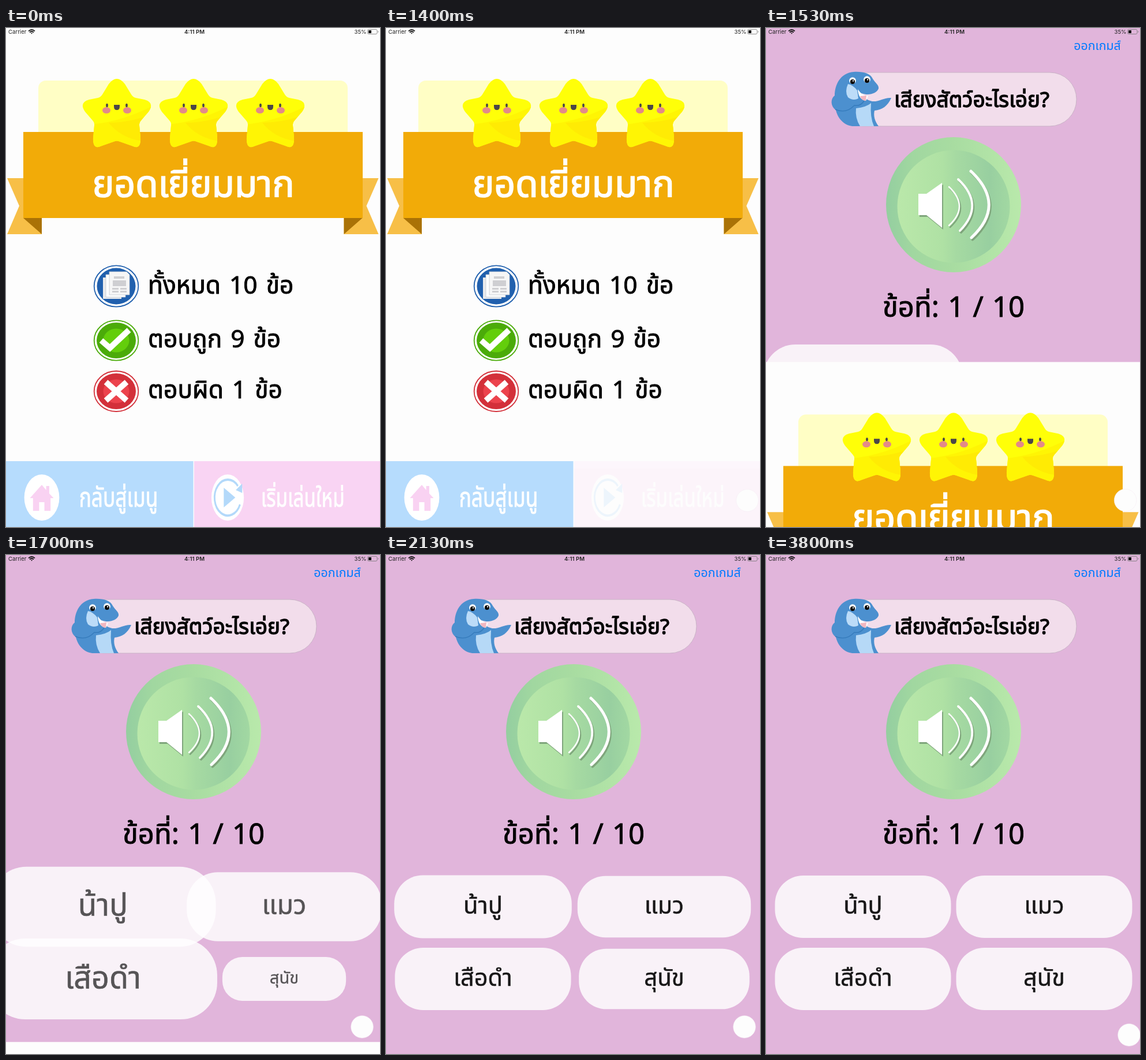
An HTML page for the animation above (4000 ms loop, 648x864 px).

```html
<!DOCTYPE html>
<html lang="th">
<head>
<meta charset="utf-8">
<title>Quiz result</title>
<style>
  html, body { margin: 0; width: 100%; height: 100%; overflow: hidden; background: #e1b5db; }
  svg { display: block; width: 648px; height: 864px; }
  text { font-family: "Noto Sans Thai Looped", "Noto Sans Thai", "Noto Sans", sans-serif; }
  .mid { text-anchor: middle; }
  .dark { fill: #000; stroke: #000; stroke-width: .9; }
  .light { fill: #fff; stroke: #fff; stroke-width: .9; }
  .row { font-size: 42.5px; word-spacing: 4px; }
  .status text { font: 9.6px Inter, sans-serif; fill: #222; }
  .status .clock { font-weight: 600; }
</style>
</head>
<body>
<svg viewBox="0 0 648 864">
  <defs>
    <linearGradient id="rim">
      <stop offset="0" stop-color="#94cea0"/><stop offset=".2" stop-color="#a1d7a0"/>
      <stop offset=".5" stop-color="#a8dca1"/><stop offset="1" stop-color="#b9e9ab"/>
    </linearGradient>
    <linearGradient id="face">
      <stop offset="0" stop-color="#bae8aa"/><stop offset=".4" stop-color="#afe1a4"/>
      <stop offset=".52" stop-color="#a6daa2"/><stop offset=".82" stop-color="#98cfa0"/>
      <stop offset="1" stop-color="#a2d8a2"/>
    </linearGradient>
    <path id="starShape" d="M-14 97Q0 79 14 97L25 115Q28 120 33 121L48 124Q66 129 55 145L42 160Q38 164 39 169L41 190Q42 212 26 204L6 197Q0 194-6 197L-26 204Q-42 212-41 190L-39 169Q-38 164-42 160L-55 145Q-66 129-48 124L-33 121Q-28 120-25 115Z"/>
    <clipPath id="starClip"><use href="#starShape"/></clipPath>
    <g id="star">
      <use href="#starShape" fill="#ffff08"/>
      <g clip-path="url(#starClip)">
        <path d="M-60 168Q0 166 60 136V210H-60Z" fill="#fff504"/>
        <path d="M-14 164Q6 190 44 196V210H60V150Q20 164-14 164Z" fill="#ffeb04"/>
      </g>
      <g fill="#4b4748">
        <ellipse cx="-17" cy="134" rx="1.9" ry="3.2"/>
        <ellipse cx="17" cy="134" rx="1.9" ry="3.2"/>
        <path d="M-5 133H5V136Q5 142 0 142T-5 136Z"/>
      </g>
      <g fill="#e38a88">
        <ellipse cx="-18" cy="142.500" rx="7" ry="5.500"/>
        <ellipse cx="18" cy="142.500" rx="7" ry="5.500"/>
      </g>
    </g>
    <g id="tail">
      <path d="M2 260H62V357H2L23 308Z" fill="#f7bf47"/>
      <path d="M30 329H62V357Z" fill="#aa7206"/>
    </g>
    <g id="speaker">
      <path d="M264 287H278L305 268V346L278 324H264Z" stroke="none"/>
      <g fill="none" stroke-linecap="round">
        <path d="M317 275Q353 309 317 342" stroke-width="2.500"/>
        <path d="M333 262Q380 306 336 351" stroke-width="3.800"/>
        <path d="M355 248Q417 306 356 363" stroke-width="5"/>
      </g>
    </g>
  </defs>

  <g id="game">
    <rect width="648" height="864" fill="#e1b5db"/>
    <text x="574" y="38" class="mid" font-size="21.300" fill="#007aff">ออกเกมส์</text>
    <rect x="122" y="77" width="416" height="93" rx="46" fill="#f2ddeb" stroke="#c9b2c6"/>
    <text x="356.500" y="137" class="mid dark" font-size="37" style="stroke-width:1.3">เสียงสัตว์อะไรเอ่ย?</text>

    <g id="dolphin">
      <path d="M152 76C128 78 119 99 119 117C111 123 112 136 121 142C125 160 139 170 152 170H195C188 161 186 151 188 143C201 142 211 135 217 121C205 120 196 128 184 127C175 125 168 120 166 113C178 118 192 113 195 105C196 99 190 96 185 88C181 78 166 75 152 76Z" fill="#4c90cf"/>
      <path d="M142 97Q136 110 142 120Q151 127 160 122L158 108Q150 98 142 97Z" fill="#bcdcf8"/>
      <path d="M156 139Q174 137 182 130Q180 154 187 170H163Q154 156 156 139Z" fill="#b6d9f7"/>
      <path d="M120 141Q139 149 153 134Q164 136 170 126" fill="none" stroke="#367cbd" stroke-width="1.500"/>
      <path d="M159 106Q166 117 177 118L173 126Q160 124 159 106Z" fill="#fff"/>
      <path d="M163 118L174 117L173 126Q166 126 163 118Z" fill="#f3b6c0"/>
      <circle cx="150" cy="91" r="5.800" fill="#fff"/><circle cx="175" cy="89" r="5.800" fill="#fff"/>
      <circle cx="150" cy="93" r="4"/><circle cx="175" cy="91" r="4"/>
      <circle cx="151" cy="91.500" r="1.200" fill="#fff"/><circle cx="176" cy="89.500" r="1.200" fill="#fff"/>
    </g>

    <circle cx="325" cy="306" r="117" fill="url(#rim)"/>
    <circle cx="325" cy="309" r="97.500" fill="url(#face)"/>
    <use href="#speaker" x="2" y="3" fill="#7fa57c" stroke="#7fa57c"/>
    <use href="#speaker" fill="#fff" stroke="#fff"/>
    <text x="325" y="500" class="mid dark" font-size="49" word-spacing="2.500">ข้อที่: 1 / 10</text>
    <g id="answers"></g>
  </g>

  <g id="sheet">
    <rect width="648" height="864" fill="#fdfdfd"/>
    <rect x="56" y="91" width="536" height="110" rx="13" fill="#fffec5"/>
    <use href="#tail"/>
    <use href="#tail" transform="translate(647.500) scale(-1 1)"/>
    <rect x="30" y="180" width="588" height="149" fill="#f2ab08"/>
    <use href="#star" x="192"/><use href="#star" x="325"/><use href="#star" x="458"/>
    <text x="324.500" y="292" class="mid light" font-size="64" style="stroke-width:1.6">ยอดเยี่ยมมาก</text>

    <g fill="#2060ae">
      <ellipse cx="191" cy="447" rx="38.300" ry="35.700" fill="#fff" stroke="#2060ae" stroke-width="1.800"/>
      <ellipse cx="191" cy="447" rx="33.500" ry="31.500"/>
      <path d="M168 432H200V469H168Z" fill="#e9eaec"/>
      <path d="M173 427H207V466H173Z" fill="#fff" stroke="#b9c3d0" stroke-width=".8"/>
      <path d="M179 422H209L214 427V462H179Z" fill="#f6f6f6" stroke="#c3c8d0" stroke-width=".8"/>
      <path d="M187 430H205V434H187ZM185 437H208V447H185ZM184 450H195V453H184ZM198 450H209V453H198ZM184 455H195V458H184ZM198 455H209V458H198Z" fill="#cfcfd2"/>
    </g>
    <ellipse cx="191" cy="541" rx="38.300" ry="34.700" fill="#fff" stroke="#4bab09" stroke-width="1.800"/>
    <ellipse cx="191" cy="541" rx="34" ry="31" fill="#4bab09"/>
    <ellipse cx="191" cy="541" rx="22.500" ry="20.500" fill="#63ce0b"/>
    <path d="M165 541L180 554L213 523" fill="none" stroke="#fff" stroke-width="10"/>
    <ellipse cx="191" cy="629" rx="38.300" ry="35" fill="#fff" stroke="#d3303a" stroke-width="1.800"/>
    <ellipse cx="191" cy="629" rx="34" ry="31" fill="#d3303a"/>
    <ellipse cx="191" cy="629" rx="22.500" ry="20.500" fill="#ec434d"/>
    <path d="M173 613L209 645M209 613L173 645" stroke="#fff" stroke-width="10"/>
    <text x="246" y="459.500" class="row dark">ทั้งหมด 10 ข้อ</text>
    <text x="246" y="552.500" class="row dark">ตอบถูก 9 ข้อ</text>
    <text x="246" y="640.500" class="row dark">ตอบผิด 1 ข้อ</text>

    <rect y="750" width="324.500" height="114" fill="#b6dcfd"/>
    <g transform="translate(62 813) scale(.76 1)">
      <ellipse rx="40" ry="40" fill="#fff"/>
      <path d="M-27 1L0-22L10-13V-20H17V-7L27 1H20V23H6V8H-6V23H-20V1Z" fill="#f9d2f2"/>
      <text x="175" y="16" class="mid light" font-size="46.500">กลับสู่เมนู</text>
    </g>
    <g id="replay">
      <rect x="326" y="750" width="322" height="114" fill="#f9d4f3"/>
      <g transform="translate(384 813) scale(.74 1)">
        <ellipse rx="38" ry="40" fill="#fff"/>
        <path d="M-9-17L18 0L-9 17Z" fill="#b3d9fa"/>
        <path d="M24-20A31 31 0 1 0 29 12" fill="none" stroke="#b3d9fa" stroke-width="4"/>
        <path d="M34-24V-8L19-13Z" fill="#b3d9fa"/>
        <text x="176" y="16" class="mid light" font-size="45">เริ่มเล่นใหม่</text>
      </g>
    </g>
  </g>

  <circle id="touch" r="19.300" fill="#fdfdfd" stroke="#f5ebf4" stroke-width=".6"/>

  <g class="status">
    <text x="4" y="10">Carrier</text>
    <g fill="none" stroke="#111" stroke-width="1.700">
      <path d="M39 5.300Q44.500 .7 50 5.300M41 7.500Q44.500 4.500 48 7.500"/>
      <path d="M42.800 8.500H46.200L44.500 10.500Z" fill="#111" stroke="none"/>
    </g>
    <text x="326.500" y="10" class="mid clock">4:11 PM</text>
    <text x="603.500" y="10">35%</text>
    <rect x="626.500" y="2.500" width="16.500" height="8" rx="2" fill="none" stroke="#777" stroke-width=".8"/>
    <rect x="628" y="4" width="5" height="5" fill="#111"/>
    <path d="M644.500 5Q646.500 6.500 644.500 8Z" fill="#777"/>
  </g>
</svg>

<script>
const LOOP = 4000;
const $ = id => document.getElementById(id);
const clamp = (v, a, b) => Math.min(b, Math.max(a, v));

// label, centre, and spring displacement / swing at 1700 ms
const answers = [
  ["น้าปู", 168, 609, .285, -.13],
  ["แมว", 482, 609, .105, .25],
  ["เสือดำ", 168, 734, .3, 0],
  ["สุนัข", 482, 734, -.305, .5]
].map(([label, x, y, rest, swing]) => {
  $("answers").insertAdjacentHTML("beforeend",
    `<g><rect x="-152.5" y="-54" width="305" height="108" rx="49" fill="#fff" fill-opacity=".82"/>
     <text class="mid dark" y="12" font-size="41.5" style="stroke-width:.5">${label}</text></g>`);
  const el = $("answers").lastElementChild;
  return { el, text: el.querySelector("text"), x, y, rest, swing };
});

// time, x, y
const path = [
  [1430, 626, 818], [1700, 617, 817], [1900, 618, 817], [2130, 621, 817], [2400, 621, 818],
  [2530, 621, 818], [2730, 618.5, 819.5], [2960, 621, 823.5], [3060, 620, 824],
  [3360, 628, 827], [3600, 628, 828], [3800, 629, 831]
];

function along(t) {
  const i = path.findIndex(p => p[0] > t);
  if (i < 0) return path[path.length - 1].slice(1);
  if (i === 0) return path[0].slice(1);
  const [a, b] = [path[i - 1], path[i]];
  const k = (t - a[0]) / (b[0] - a[0]);
  return [1, 2].map(n => a[n] + (b[n] - a[n]) * k);
}

function slide(t) {
  if (t < 1413) return 0;
  if (t >= 1860) return 1;
  const u = (t - 1413) * .0195;
  return 1 - (1 + u) * Math.exp(-u);
}

function scaleOf(b, t) {
  if (t >= 2400) return 1;
  const u = Math.max(-.19, (t - 1700) / 1000), w = 11 * u;
  return Math.max(0, 1 + Math.exp(-6.5 * u) * (b.rest * Math.cos(w) + b.swing * Math.sin(w)));
}

function draw(t) {
  const press = clamp((t - 730) / 370, 0, 1);
  $("replay").setAttribute("opacity", 1 - .8 * press);
  $("sheet").setAttribute("transform", `translate(0 ${864 * slide(t)})`);
  $("touch").setAttribute("opacity", press);
  $("touch").setAttribute("transform", `translate(${along(t)})`);
  const ink = clamp(.65 + (t - 1700) / 1000, 0, .9);
  for (const b of answers) {
    b.el.setAttribute("transform", `translate(${b.x} ${b.y}) scale(${scaleOf(b, t)})`);
    b.text.setAttribute("opacity", ink);
  }
}

const start = performance.now();
function tick() {
  draw((performance.now() - start) % LOOP);
  requestAnimationFrame(tick);
}
draw(0);
tick();
</script>
</body>
</html>
```
